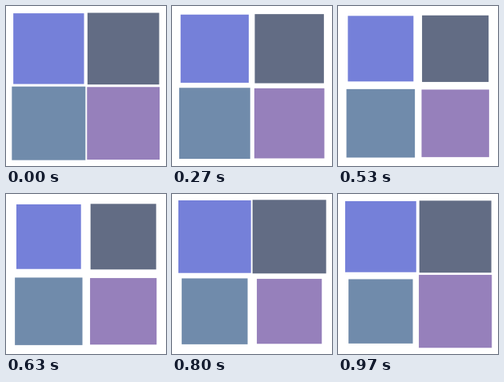
An HTML page that plays this animation: 200x200 px, repeating every 1000 ms.

```html
<!DOCTYPE html>
<html lang="en">
<head>
<meta charset="utf-8">
<title>Four shrinking squares</title>
<style>
  html, body { margin: 0; width: 100%; height: 100%; overflow: hidden; background: #fff; }
  svg { display: block; width: 100vw; height: 100vh; }
</style>
</head>
<body>
<svg viewBox="0 0 200 200">
  <rect fill="#7580d9"/>
  <rect fill="#626c84"/>
  <rect fill="#708bab"/>
  <rect fill="#9680bb"/>
</svg>
<script>
const STEPS = 30;                // picture changes per one-second loop
const NEAR = 160 / 3, FAR = 440 / 3;
const BIG = 92, SMALL = 80;
const squares = [
  { x: NEAR, y: NEAR, lead: 9 },
  { x: FAR, y: NEAR, lead: 6 },
  { x: NEAR, y: FAR, lead: 0 },
  { x: FAR, y: FAR, lead: 3 },
];
const rects = document.querySelectorAll('rect');

function draw(ms) {
  // steps of 1/30 s, starting on the nearest 10 ms
  const step = Math.floor((Math.floor(ms % 1000 / 10) + 0.5) * STEPS / 100);
  squares.forEach(({ x, y, lead }, i) => {
    const phase = (step + lead) % STEPS / STEPS;
    const size = BIG + (SMALL - BIG) * phase;
    const attrs = { x: x - size / 2, y: y - size / 2, width: size, height: size };
    for (const name in attrs) rects[i].setAttribute(name, attrs[name]);
  });
}

const start = performance.now();
function tick() {
  draw(performance.now() - start);
  requestAnimationFrame(tick);
}
tick();
</script>
</body>
</html>
```
